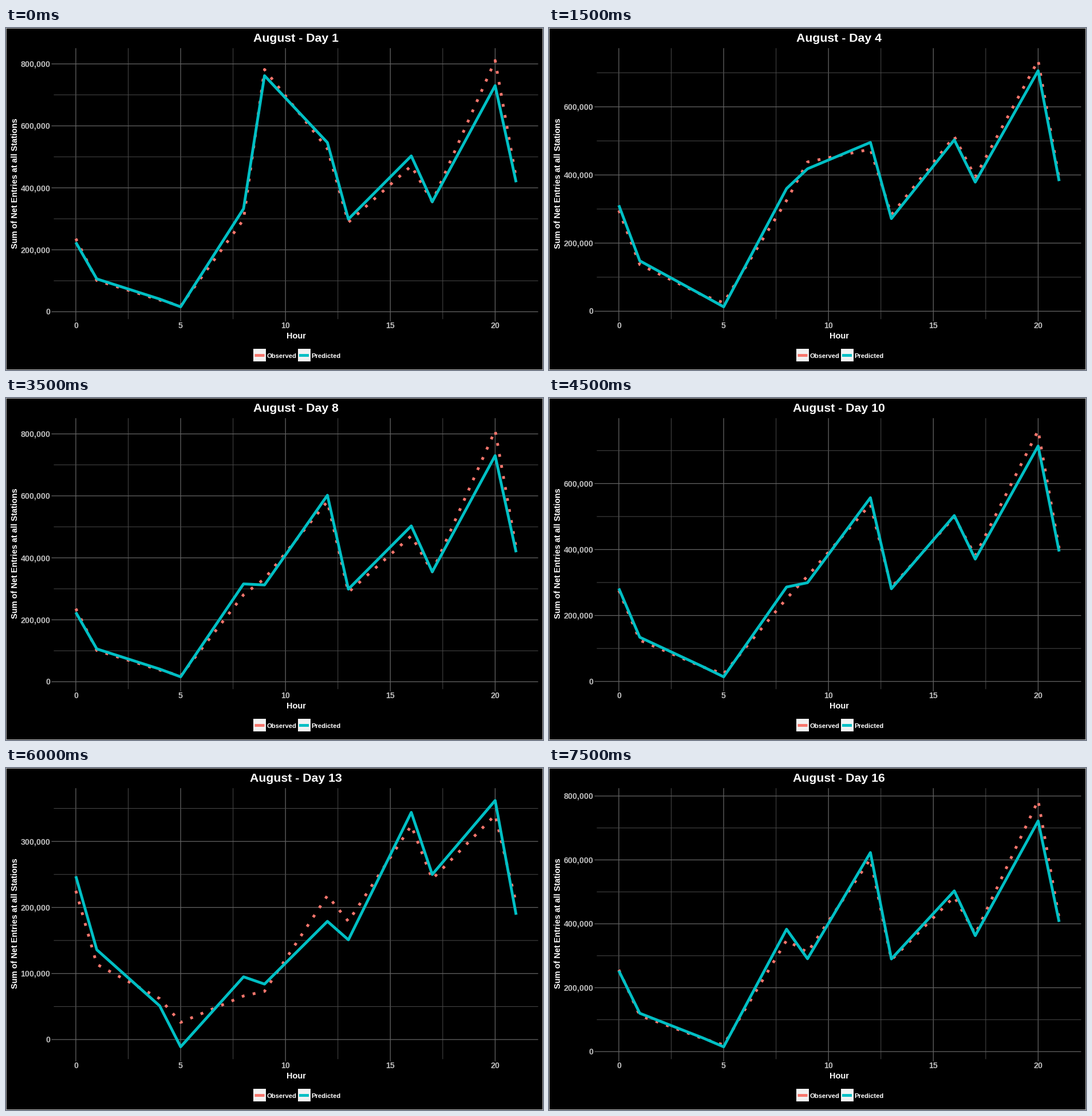
Animation, 938 px wide and 597 px high, one loop 8000 ms. Source, as a matplotlib script:

```python
import numpy as np
import matplotlib.pyplot as plt
from matplotlib.animation import ArtistAnimation
from matplotlib.patches import Rectangle

W, H, DPI = 938, 597, 64
PX = 72 / DPI  # points per pixel
LEFT, RIGHT, TOP, BOTTOM = 83.5, 929.5, 35.2, 508.2
LINE = 4.885
CORAL, TEAL = "#F8766D", "#00BFC4"
MAJOR, MINOR, TICK_TEXT = "#626262", "#4a4a4a", "#bfbfbf"

plt.rcParams["font.family"] = "Liberation Sans"
plt.rcParams["font.weight"] = "bold"

# Key points of the daily curves, in thousands of entries
HOURS = np.array([0, 1, 4, 5, 8, 9, 12, 13, 16, 17, 20, 21])
WORKDAY = np.array([224, 106, 41, 16, 330, 290, 538, 299, 503, 355, 730, 418])
WORK_GAP = np.array([12, -5, -3, 3, -35, 20, -20, -10, -32, 0, 81, 14])
SUNDAY = np.array([260, 143, 51, -11, 95, 84, 179, 151, 344, 250, 362, 189])
SUN_GAP = np.array([-22, -22, 11, 37, -29, -11, 39, 28, -20, -7, -22, 18])
# Change per day from Tuesday to Friday
DRIFT = np.array([29, 14, 2, -1, 0, 0, 0, -9, 0, 8, -8, -12])
GAP_DRIFT = np.array([-9, -2, 1, 3, 0, 0, 0, 7, 14, 5, -17, -2])


def workday(day, since_tue):
    pred = WORKDAY + DRIFT * since_tue
    pred[4] += (20 + 2.5 * day) * np.cos(2 * np.pi * (day - 4) / 13)
    pred[5] += 472 * np.exp((1 - day) / 2.3)  # early morning peak fades out
    pred[6] += 8 * day - 43 * np.sqrt(max(since_tue, 0))
    return np.array([pred, pred + WORK_GAP + GAP_DRIFT * since_tue])


def sunday(day):
    pred = SUNDAY.astype(float)
    pred[:2] *= 1 - 0.014 * (day - 9.5)
    return np.array([pred, pred + SUN_GAP])


def curves(day):
    """Predicted and observed values; day 1 is a Tuesday."""
    k = (day - 1) % 7
    if k == 5:
        return sunday(day)
    if k == 4:
        return 0.75 * sunday(day) + 0.25 * workday(day, 3.0)
    return workday(day, -1.0 if k == 6 else float(k))


def x_pos(hour):
    pad = (RIGHT - LEFT) / 22
    return LEFT + pad + hour * (RIGHT - LEFT - 2 * pad) / 21


fig = plt.figure(figsize=(W / DPI, H / DPI), dpi=DPI, facecolor="#b8b8b8")
ax = fig.add_axes([0, 0, 1, 1])
ax.set(xlim=(0, W), ylim=(H, 0))
ax.axis("off")


def label(x, y, s, size, color="white", ha="center", **kw):
    return ax.text(x, y, s, fontsize=size * PX, color=color, ha=ha,
                   va="baseline", **kw)


def stroke(x, y, color, width, z=1, **kw):
    return ax.plot(x, y, color=color, lw=width * PX, zorder=z, snap=False,
                   solid_capstyle="butt", **kw)[0]


def draw_static():
    ax.add_patch(Rectangle((1, 1), W - 2, H - 2, fc="black", ec="none", zorder=0))
    for h in np.arange(0, 21, 2.5):
        x = x_pos(h)
        if h % 5 == 0:
            stroke([x, x], [TOP, BOTTOM + 4], MAJOR, 1.3)
            label(x, 524, f"{h:.0f}", 14.2, TICK_TEXT)
        else:
            stroke([x, x], [TOP, BOTTOM], MINOR, 1)
    label(506.5, 541.5, "Hour", 14.5)
    label(20, 271.5, "Sum of Net Entries at all Stations", 14.5,
          rotation=90, rotation_mode="anchor")
    for x, name, color in ((432, "Observed", CORAL), (509.5, "Predicted", TEAL)):
        ax.add_patch(Rectangle((x, 560), 22, 22, fc="#f2f2f2", ec="none"))
        stroke([x + 2.5, x + 19.5], [571.5, 571.5], color, LINE, z=3)
        label(x + 24, 576, name, 11.3, ha="left")


def draw_day(day):
    both = curves(day)
    pad = np.ptp(both) * 0.05
    lo, hi = both.min() - pad, both.max() + pad

    def y_pos(v):
        return BOTTOM - (v - lo) / (hi - lo) * (BOTTOM - TOP)

    art = [label(506.5, 24.3, f"August - Day {day}", 21.2)]
    half = 50 if hi - lo < 500 else 100
    for i in range(int(np.ceil(lo / half)), int(hi // half) + 1):
        v = i * half
        y = y_pos(v)
        if i % 2:
            art.append(stroke([LEFT, RIGHT], [y, y], MINOR, 1))
        else:
            art.append(stroke([LEFT - 4, RIGHT], [y, y], MAJOR, 1.3))
            art.append(label(77.5, y + 5, f"{v * 1000:,}", 14.2,
                             TICK_TEXT, ha="right"))
    x = x_pos(HOURS)
    pred, obs = y_pos(both)
    art.append(stroke(x, obs, CORAL, LINE, z=4, ls=(0, (1, 3)),
                      dash_capstyle="butt", dash_joinstyle="round"))
    art.append(stroke(x, pred, TEAL, LINE, z=5, solid_joinstyle="round"))
    return art


draw_static()
frames = [draw_day(day) for day in range(1, 17)]
anim = ArtistAnimation(fig, frames, interval=500, repeat=True, repeat_delay=0)
plt.show()
```
